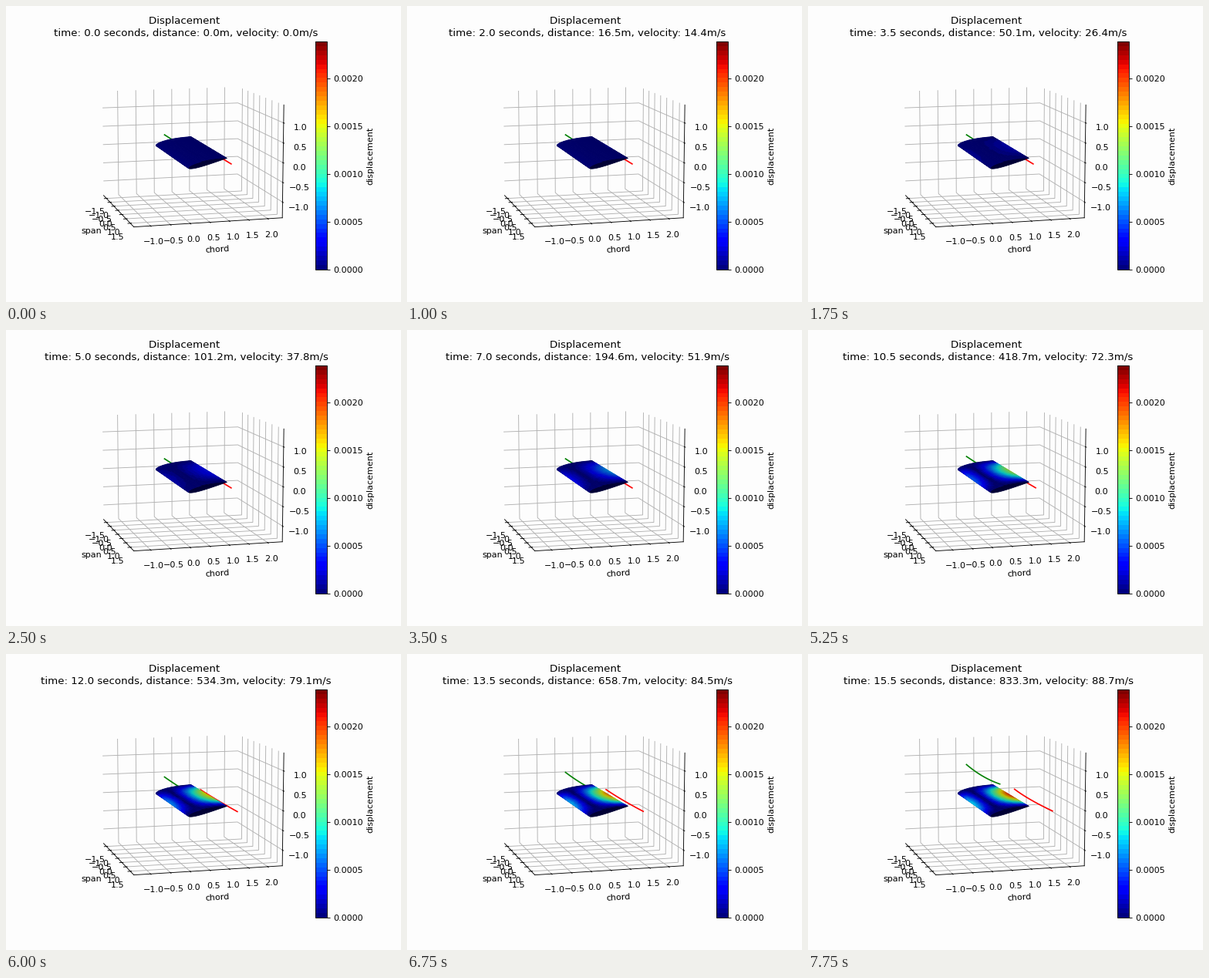
These frames come from a looping animation (512 px wide and 384 px high, 8 s). A matplotlib script:

```python
import numpy as np
import matplotlib.pyplot as plt
from matplotlib.animation import FuncAnimation
from matplotlib.cm import ScalarMappable
from matplotlib.colors import Normalize
from mpl_toolkits.mplot3d.art3d import Poly3DCollection

FRAMES, INTERVAL, STEP = 32, 250, 0.5
PAPER = "#fdfdfd"
HALF_SPAN = 1.7
PITCH = np.radians(11.4)
ELEV, AZIM = 10, -15

# Run log: time, distance and mean velocity over the last step
T = np.array([2, 5, 7, 10.5, 13.5, 15.5])
DIST = np.array([16.5, 101.2, 194.6, 418.7, 658.7, 833.3])
VEL = np.array([14.4, 37.8, 51.9, 72.3, 84.5, 88.7])
dist_fit = np.polyfit(T, DIST / T**2, 5)
vel_fit = np.polyfit(T, VEL / (T - STEP / 2), 5)


def distance(t):
    return t**2 * np.polyval(dist_fit, t)


def velocity(t):
    return (t - STEP / 2) * np.polyval(vel_fit, t) if t > 0 else 0.0


def unit(v):
    return v / np.linalg.norm(v, axis=-1, keepdims=True)


def profile(n=56):
    """Closed, slightly cambered section: upper tail, nose, lower tail."""
    a = np.linspace(0, 2 * np.pi, n + 1)
    c = (1 + np.cos(a)) / 2
    h = 0.6 * (0.2969 * np.sqrt(c) - 0.126 * c - 0.3516 * c**2
               + 0.2843 * c**3 - 0.1036 * c**4)
    h = np.where(a < np.pi, h, -h) + 0.05 * c * (1 - c)
    y = 0.495 + (c - 0.5) * np.cos(PITCH) - h * np.sin(PITCH)
    z = 0.045 + (c - 0.5) * np.sin(PITCH) + h * np.cos(PITCH)
    return c, y, z


def build_wing(rows=30):
    """Visible faces with their displacement shape and shading factor."""
    e, a = np.radians([ELEV, AZIM])
    eye = np.array([np.cos(e) * np.cos(a), np.cos(e) * np.sin(a), np.sin(e)])
    light = unit(np.array([-2.0, -2.0, 1.0]))
    c, y, z = profile()
    xs = np.linspace(-HALF_SPAN, HALF_SPAN, rows + 1)
    faces, shape, normals = [], [], []
    for j in range(len(c) - 1):
        along = np.array([0, y[j + 1] - y[j], z[j + 1] - z[j]])
        normal = unit(np.cross(along, [1, 0, 0]))
        if normal @ eye <= 0:
            continue
        bend = abs((c[j] + c[j + 1]) / 2 - 0.28) / 0.72
        for x0, x1 in zip(xs[:-1], xs[1:]):
            s = (x0 + x1) / 2 / HALF_SPAN
            faces.append([(x0, y[j], z[j]), (x0, y[j + 1], z[j + 1]),
                          (x1, y[j + 1], z[j + 1]), (x1, y[j], z[j])])
            shape.append(bend * (1 - s**2) ** 1.2)
            normals.append(normal)
    faces.append([(HALF_SPAN, p, q) for p, q in zip(y, z)])
    shape.append(0)
    normals.append(np.array([1.0, 0, 0]))
    shade = 0.3 + 0.35 * (np.array(normals) @ light + 1)
    return faces, np.array(shape), shade


fig = plt.figure(figsize=(6.4, 4.8), dpi=80, facecolor=PAPER)
ax = fig.add_subplot(projection="3d")
ax.set_facecolor(PAPER)
ax.view_init(elev=ELEV, azim=AZIM)
for axis in (ax.xaxis, ax.yaxis, ax.zaxis):
    axis.set_pane_color(PAPER)

cmap = plt.get_cmap("jet", 50)
norm = Normalize(0, 0.002387)
fig.colorbar(ScalarMappable(norm, cmap), ax=ax, label="displacement")

faces, shape, shade = build_wing()
wing = Poly3DCollection(faces, linewidths=0.7)
ax.add_collection3d(wing)

span = np.linspace(-HALF_SPAN, HALF_SPAN, 40)
flat = np.ones_like(span)
lift, = ax.plot(span, 0.245 * flat, 0.23 * flat, color="green")
drag, = ax.plot(span, 1.1 * flat, -0.005 * flat, color="red")

ax.set_xticks(np.arange(-1.5, 1.6, 0.5))
ax.set_yticks(np.arange(-1.0, 2.1, 0.5))
ax.set_zticks(np.arange(-1.0, 1.1, 0.5))
ax.set_xlim(-1.9, 1.9)
ax.set_ylim(-1.415, 2.385)
ax.set_zlim(-1.402, 1.448)
ax.set_xlabel("span")
ax.set_ylabel("chord")


def update(i):
    t = i * STEP
    v = velocity(t)
    # 3D axes scale the title height by 0.92
    ax.set_title(f"Displacement \ntime: {t:.1f} seconds, "
                 f"distance: {distance(t):.1f}m, velocity: {v:.1f}m/s",
                 y=1 / 0.92, linespacing=1.3)

    colors = cmap(norm(0.00205 * (v / 88.7) ** 2 * shape))
    colors[:, :3] *= shade[:, None]
    wing.set_facecolor(colors)
    wing.set_edgecolor(colors)

    # Loads grow late in the run and stay weaker at mid-span
    grow = 0.5 * (max(t - 8.5, 0) / 7) ** 1.65
    load = grow * (1 - 0.11 * (1 - (span / HALF_SPAN) ** 2))
    lift.set_data_3d(span, 0.245 * flat, 0.23 + load)
    drag.set_data_3d(span, 1.1 + load, -0.005 * flat)
    return wing, lift, drag


anim = FuncAnimation(fig, update, frames=FRAMES, interval=INTERVAL,
                     init_func=lambda: update(0), repeat=True, repeat_delay=0)
plt.show()
```
